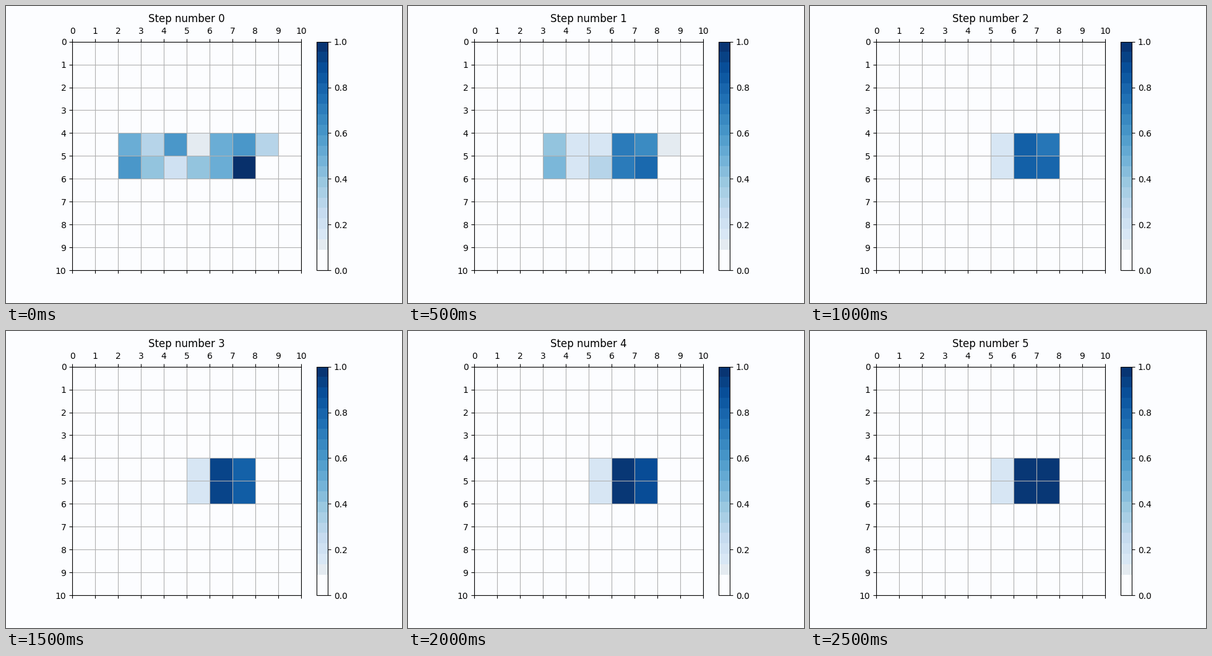
These frames come from a looping animation (640x480 px, 3 s). A matplotlib script:

```python
import numpy as np
import matplotlib.pyplot as plt
from matplotlib.animation import FuncAnimation
from matplotlib.cm import ScalarMappable
from matplotlib.colors import ListedColormap, Normalize, to_rgba

STEPS = 6
PAPER, FAINT = "#fcfdff", "#e4ebf1"
FLOOR = 0.09    # values below this look like bare paper
SETTLED = 0.16  # where the cells behind the block come to rest
FULL = 0.97


def blues(bands):
    """Blues in equal bands, with a paper-coloured low end."""
    values = (np.arange(bands) + 0.5) / bands
    colors = plt.cm.Blues(values)
    colors[values < 0.125] = to_rgba(FAINT)
    colors[values < FLOOR] = to_rgba(PAPER)
    return ListedColormap(colors)


def grid_values(step):
    grid = np.zeros((10, 10))
    upper, lower = grid[4], grid[5]
    if step == 0:
        upper[2:9] = 0.5, 0.3, 0.6, 0.1, 0.5, 0.6, 0.3
        lower[2:8] = 0.6, 0.4, 0.2, 0.4, 0.5, 1.0
        return grid

    # The outer cells drain away while the block fills up
    if step == 1:
        upper[3], lower[3] = 0.4, 0.46
        upper[4] = lower[4] = SETTLED
        upper[8] = 0.1
    t = (step - 1) / (STEPS - 2)
    upper[5] = SETTLED
    lower[5] = max(SETTLED, 0.3 - 0.6 * t)
    upper[6] = lower[6] = min(FULL, 0.71 + 0.42 * t)
    upper[7] = 0.65 + (FULL - 0.65) * t
    lower[7] = 0.78 + (FULL - 0.78) * t ** 2
    return grid


fig, ax = plt.subplots(figsize=(6.4, 4.8), dpi=100, facecolor=PAPER)
ax.set_facecolor(PAPER)
image = ax.matshow(grid_values(0), cmap=blues(256), vmin=0, vmax=1,
                   extent=(0, 10, 10, 0), interpolation="nearest")
fig.colorbar(ScalarMappable(Normalize(0, 1), blues(22)), ax=ax)
ax.set_xticks(range(11))
ax.set_yticks(range(11))
ax.grid(True)
title = ax.set_title("Step number 0")


def update(step):
    image.set_data(grid_values(step))
    title.set_text(f"Step number {step}")
    return image, title


anim = FuncAnimation(fig, update, frames=STEPS, interval=500, repeat=True,
                     repeat_delay=0, blit=False)
plt.show()
```
